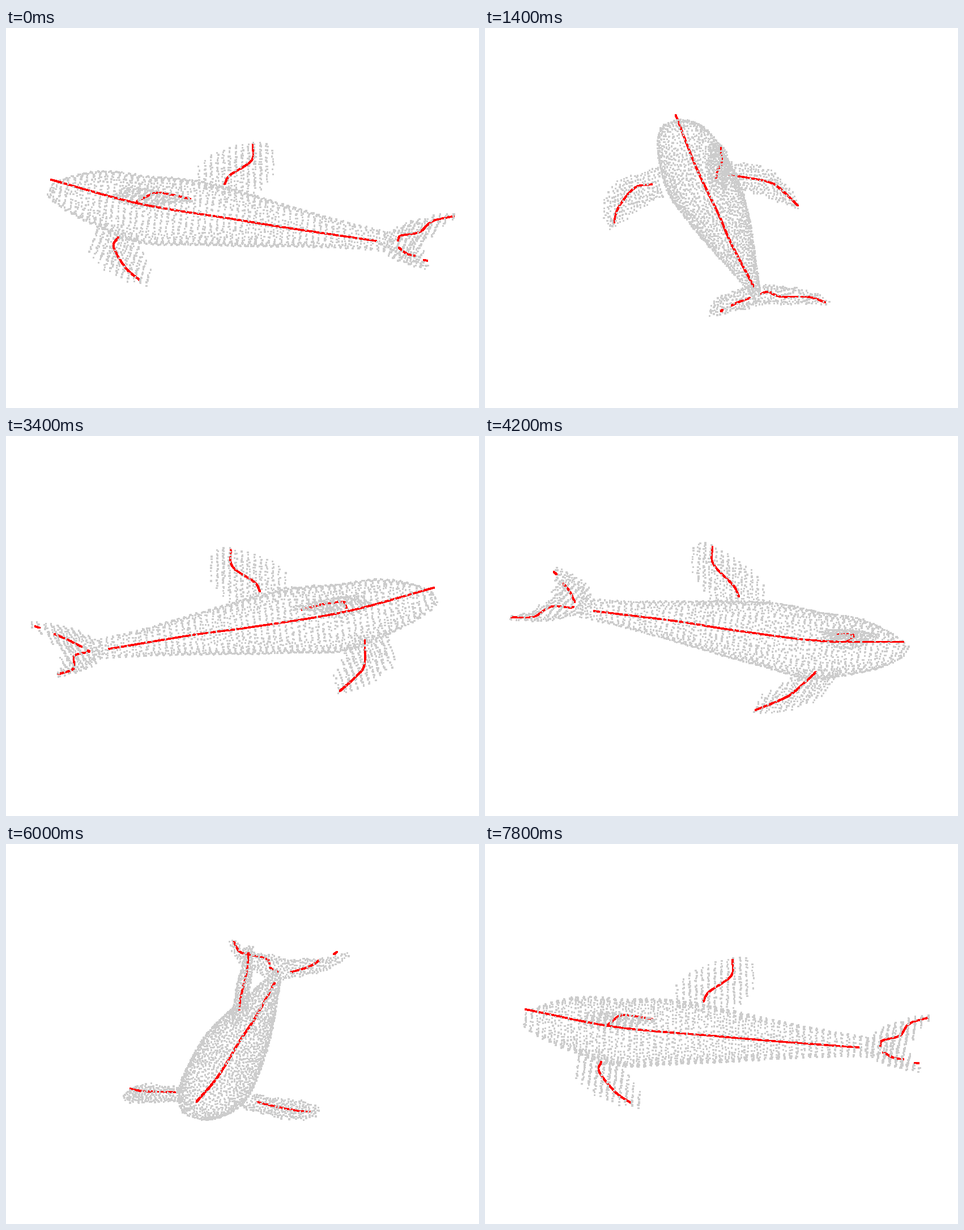
A matplotlib script for the animation above (8000 ms loop, 835x671 px).

```python
import numpy as np
import matplotlib.pyplot as plt
from matplotlib.animation import FuncAnimation

W, H, DPI = 835, 671, 100
FRAMES, INTERVAL = 40, 200
SLICE, GAP = 11.2, 5.0          # spacing between slices, spacing inside a slice
SIN_E, COS_E = 0.4465, 0.895    # camera elevation
NOSE, TAIL = -349, 268
GREY, RED = (0.8, 0.8, 0.8), (1.0, 0.0, 0.0)
rng = np.random.default_rng(4)


def spline(knots, s):
    """Catmull-Rom curve through the knots at parameters s in 0..1."""
    k = np.array(knots, float)
    k = np.vstack([2 * k[0] - k[1], k, 2 * k[-1] - k[-2]])
    pos = np.asarray(s) * (len(knots) - 1)
    i = np.minimum(pos.astype(int), len(knots) - 2)
    t = (pos - i)[:, None]
    a, b, c, d = (k[i + j] for j in range(4))
    return 0.5 * (2 * b + (c - a) * t + (2 * a - 5 * b + 4 * c - d) * t ** 2
                  + (3 * b - a - 3 * c + d) * t ** 3)


def bone(*knots):
    length = np.linalg.norm(np.diff(knots, axis=0), axis=1).sum()
    return spline(knots, np.linspace(0, 1, int(length * 1.2) + 2))


def snap(u):
    return SLICE * np.round(u / SLICE)


def section(u):
    """Centre height, half width and half height of the body at u."""
    t = np.clip((u - NOSE) / (TAIL - NOSE), 0, 1)
    mid = 14 - 30 * t - 10 * np.exp(-((t - 0.28) / 0.1) ** 2)
    wide = 20 - 15 * t + 45 * np.sin(np.pi * t ** 0.66)
    tall = 5 + 15 * t + 50 * np.abs(np.sin(np.pi * t ** 0.565)) ** 1.5
    return mid, wide, tall


def body(n):
    u = snap(rng.uniform(NOSE, TAIL, n))
    a = rng.uniform(0, 2 * np.pi, n)
    mid, wide, tall = section(u)
    return np.c_[u, wide * np.cos(a), mid + tall * np.sin(a)]


def fin(lead, trail, thick, axis=2, n=3000):
    """Two-sided surface between a leading and a trailing edge."""
    s, q = rng.uniform(0, 1, (2, n))
    front, back = spline(lead, s), spline(trail, s)
    p = front + (back - front) * q[:, None]
    p[:, axis] += rng.choice([-1, 1], n) * thick * (1 - 0.7 * s) * np.sin(np.pi * q)
    p[:, 0] = snap(p[:, 0])
    mid, wide, tall = section(p[:, 0])
    inside = (p[:, 1] / wide) ** 2 + ((p[:, 2] - mid) / tall) ** 2 < 0.95
    return p[~inside | (p[:, 0] > TAIL)]


def pair(*args):
    return np.vstack([fin(*args), fin(*args) * [1, -1, 1]])


def thin(points):
    """Keep points of each slice that are at least GAP apart."""
    kept = []
    for key in np.unique(points[:, 0]):
        row = np.empty((0, 3))
        for p in points[points[:, 0] == key]:
            if not len(row) or np.min(np.hypot(*(row[:, 1:] - p[1:]).T)) > GAP:
                row = np.vstack([row, p])
        kept.append(row)
    return np.vstack(kept)


# Coordinates are (u: nose to tail, v: sideways, w: up), in pixels.
dorsal = fin([(-88, 3, 60), (-62, 3, 115), (-10, 3, 143), (35, 5, 158)],
             [(20, 3, 45), (43, 3, 76), (53, 3, 100), (50, 4, 150)], 10, 1)
flippers = pair([(-252, 54, -14), (-240, 135, -33), (-186, 171, -55), (-130, 173, -67)],
                [(-167, 66, -33), (-160, 102, -40), (-138, 135, -49), (-130, 168, -62)], 9)
flukes = pair([(250, 8, -14), (278, 55, -9), (300, 82, -8), (350, 106, -3)],
              [(322, 0, -10), (333, 32, -11), (342, 68, -10), (364, 110, -4)], 11)
skin = thin(np.vstack([body(12000), dorsal, flippers, flukes]))
skin += rng.uniform(-1, 1, skin.shape) * [1.5, 0.8, 0.8]

bones = np.vstack([
    bone((-347, 0, 35), (-188, 0, 6.6), (-18, 0, -4), (85, 3, -8.5), (243, 0, -17)),
    bone((20, 6, 150), (17, 4, 117), (-22, 2, 83), (-32, 2, 64)),
    bone((-207, 77, -25), (-208, 108, -29), (-177, 145, -49), (-147, 160, -63)),
    bone((-207, -63, -22), (-190, -130, -36), (-170, -151, -46), (-136, -171, -61)),
    bone((281, -4, -14), (284, -17, -10), (313, -32, -7), (326, -80, -7), (359, -102, -4)),
    bone((288, 18, -16), (309, 46, -12), (327, 60, -7)),
    bone((349, 82, -2.5), (356, 86, -1)),
])

cloud = np.vstack([skin, bones])
colors = np.array([GREY] * len(skin) + [RED] * len(bones))

fig = plt.figure(figsize=(W / DPI, H / DPI), dpi=DPI, facecolor="white")
ax = fig.add_axes([0, 0, 1, 1])
ax.set(xlim=(0, W), ylim=(H, 0))
ax.axis("off")
dots = ax.scatter(cloud[:, 0], cloud[:, 1], s=(3.4 * 72 / DPI) ** 2,
                  c=colors, marker="s", linewidths=0)


def update(i):
    phi = np.radians((i + 1.5) * 360 / FRAMES)
    u, v, w = cloud.T
    x = W / 2 + u * np.cos(phi) - v * np.sin(phi)
    near = u * np.sin(phi) + v * np.cos(phi)
    y = H / 2 - w * COS_E + near * SIN_E
    order = np.argsort(near * COS_E + w * SIN_E)
    dots.set_offsets(np.c_[x, y][order])
    dots.set_facecolors(colors[order])
    return [dots]


anim = FuncAnimation(fig, update, frames=FRAMES, interval=INTERVAL,
                     repeat=True, repeat_delay=0, blit=False)
plt.show()
```
